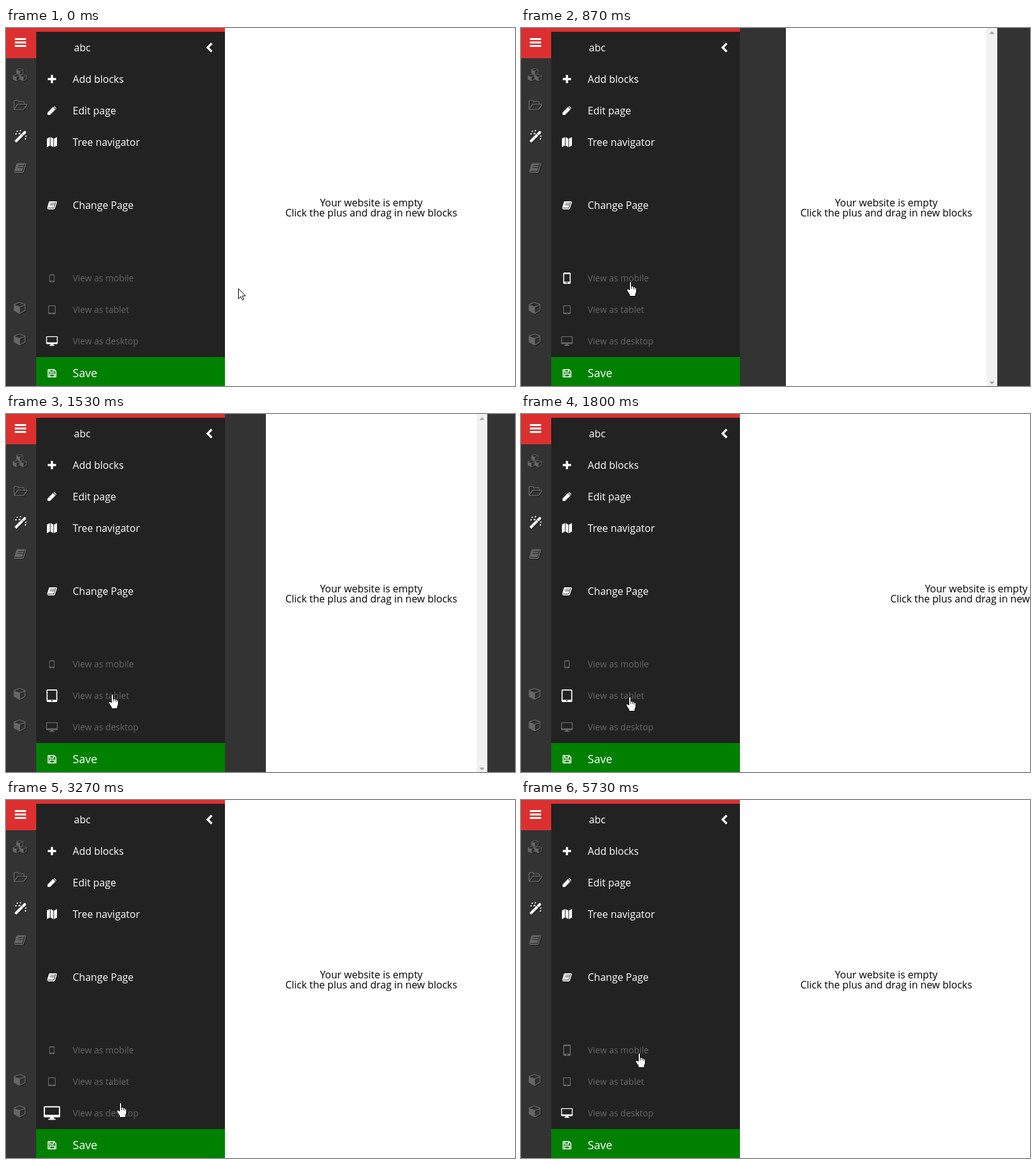
Animation, 809 px wide and 568 px high, one loop 5790 ms. Source, as an HTML page:

```html
<!DOCTYPE html>
<html lang="en">
<head>
<meta charset="utf-8">
<title>Responsive preview</title>
<style>
  html, body { margin: 0; width: 100%; height: 100%; overflow: hidden; background: #333; }
  svg { display: block; }
  text { font: 16px "Open Sans", sans-serif; fill: #fff; }
  .view { font-size: 14px; fill: #666; }
  .save { font-size: 18px; }
  .page { fill: #000; text-anchor: middle; }
  .rail { fill: #666; filter: drop-shadow(1px 1px 0 #181818); }
  .line { fill: none; stroke-linecap: round; stroke-linejoin: round; }
</style>
</head>
<body>
<svg width="809" height="568" viewBox="0 0 809 568">
  <defs>
    <path id="cube" fill-rule="evenodd" transform="scale(.0112) translate(-896 -896)" d="M896 1629l640-349v-636l-640 233zM832 764l698-254-698-254-698 254zM1664 512v768q0 74-71 114l-704 384q-57 32-122 0l-704-384q-71-40-71-114v-768q0-85 84-120l704-256q44-16 88 0l704 256q84 35 84 120z"/>
    <g id="book">
      <path d="M-4 -7.5H8Q9.500 -7 9 -5.500L5.500 5.500Q5 7 3.500 7H-6.500Q-9 6.500 -8.500 4L-5.500 -6Q-5 -7.500 -4 -7.500Z"/>
      <path class="line" stroke="#222" d="M-2.500 -4H5M-3.500 -1H4M-7 4.600H3.500L6.800 -6"/>
    </g>
  </defs>

  <rect width="809" height="568" fill="#333"/>
  <g id="site">
    <rect id="sheet" x="348" height="568" fill="#fff"/>
    <text class="page" y="283">Your website is empty</text>
    <text class="page" y="299">Click the plus and drag in new blocks</text>
    <g id="scrollbar">
      <rect x="-17" width="17" height="568" fill="#f1f1f1"/>
      <path fill="#a3a3a3" d="M-12.500 9.500h8l-4 -4.500zM-12.500 561h8l-4 4.500z"/>
    </g>
  </g>

  <rect width="48" height="568" fill="#333"/>
  <rect x="48" width="300" height="568" fill="#222"/>
  <path fill="#dc3030" d="M0 0H348V6H48V48H0Z"/>
  <rect x="48" y="522" width="300" height="46" fill="#008000"/>

  <path fill="#fff" d="M14 16h18v3h-18zM14 21.500h18v3h-18zM14 27h18v3h-18z"/>
  <g class="rail">
    <use href="#cube" transform="translate(22.500 69) scale(.6)"/>
    <use href="#cube" transform="translate(17 78.500) scale(.6)"/>
    <use href="#cube" transform="translate(28 78.500) scale(.6)"/>
    <path class="line" stroke="#666" stroke-width="1.500" d="M13 127V117Q13 115 15 115H18.500Q20 115 20 117H27Q29 117 29 119V121M13.500 128.500L18 122Q19 121 20 121H32Q34 121 33 122.500L29 128Q28 129.500 26 129.500H14.500Q13 129.500 13 127"/>
    <use href="#book" transform="translate(22.500 222.500) scale(1.080)"/>
    <use href="#cube" transform="translate(22.500 443.500)"/>
    <use href="#cube" transform="translate(22.500 493.500)"/>
    <g fill="#fff">
      <path d="M13.500 179L29 163.500Q30 162.800 31 163.800L32 165Q32.500 166 31.800 166.800L16.500 182Z"/>
      <path stroke="#333" d="M25.500 168.500l2.500 2.500l3 -3"/>
      <path d="M17 163h2v2h-2zM22 162h2v2h-2zM20 166.500h3v2h-3zM15 167h2v2h-2zM30.500 170.500h2v2h-2zM30 175h2v2h-2z"/>
    </g>
  </g>

  <g fill="#fff">
    <path class="line" stroke="#fff" stroke-width="3.400" style="stroke-linecap:butt" d="M66.500 81H79.500M73 74.500V87.500"/>
    <path d="M66 138V134L74.800 125.300L78.700 129.200L70 138ZM75.600 124.500Q76.500 123.700 77.500 124.500L79.500 126.500Q80.300 127.500 79.500 128.400Z"/>
    <path d="M65 175.500L69.800 173V186.500L65 189ZM70.800 173L75.300 175.500V189L70.800 186.500ZM76.300 175.500L81 173V186.500L76.300 189Z"/>
    <use href="#book" transform="translate(73 281.500) scale(.88)"/>
    <path class="line" stroke="#fff" stroke-width="3.400" style="stroke-linecap:butt;stroke-linejoin:miter" d="M327 24.500L320.500 31L327 37.500"/>
    <path class="line" stroke="#fff" stroke-width="1.500" d="M67 542H76.500L79.300 545V553.500H67ZM69.500 542V546H75.500V542M69.500 553.500V549H77V553.500"/>
  </g>
  <g id="labels"></g>

  <g fill-rule="evenodd">
    <path class="device" d="M-3 -6.300H3Q4.200 -6.300 4.200 -5V5Q4.200 6.300 3 6.300H-3Q-4.200 6.300 -4.200 5V-5Q-4.200 -6.300 -3 -6.300ZM-3.100 -4.500V3.800H3.100V-4.500ZM-.7 4.400V5.600H.7V4.400Z"/>
    <path class="device" d="M-4.600 -7H4.600Q6 -7 6 -5.600V5.600Q6 7 4.600 7H-4.600Q-6 7 -6 5.600V-5.600Q-6 -7 -4.600 -7ZM-4.800 -5.800V4.500H4.800V-5.800ZM-.6 5.100V6.300H.6V5.100Z"/>
    <path class="device" d="M-8 -7.500H8Q9.200 -7.500 9.200 -6.300V3.700Q9.200 5 8 5H2L2.500 6.500H4V7.800H-4V6.500H-2.500L-2 5H-8Q-9.200 5 -9.200 3.700V-6.300Q-9.200 -7.500 -8 -7.500ZM-7.800 -6.200V2.200H7.800V-6.200Z"/>
  </g>

  <g id="cursor" fill="#fff" stroke="#000" stroke-linejoin="round">
    <path id="arrow" d="M.5 .5V16.500L4.200 13L6.600 18.500L9 17.500L6.700 12H11.800Z"/>
    <g id="hand">
      <path d="M-1.500 2Q-1.500 .5 0 .5Q1.500 .5 1.500 2V8Q3.500 6.800 4.500 8.800Q6 7.800 7 9.600Q9.500 9 9.500 11.500V16Q9.500 18 8 20V23.500H-1.500V21Q-3 18.500 -5.500 15Q-6.500 12.500 -4.500 12Q-3 12 -1.500 14Z"/>
      <path fill="none" stroke-width=".8" d="M1.500 8V12M4.500 9V12M7 10V13"/>
    </g>
  </g>
</svg>
<script>
const LOOP = 5790, STEP = 200 / 3;
const PANEL_RIGHT = 348, DESKTOP = 482;
const MOBILE = 0, TABLET = 1, SCREEN = 2;
const $ = id => document.getElementById(id);

const labels = [
  ["abc", 108, 37], ["Add blocks", 106, 87], ["Edit page", 106, 137],
  ["Tree navigator", 106, 187], ["Change Page", 106, 287],
  ["View as mobile", 106, 402, "view"], ["View as tablet", 106, 452, "view"],
  ["View as desktop", 106, 502, "view"], ["Save", 106, 554, "save"]
];
$("labels").innerHTML = labels.map(([s, x, y, c = ""]) =>
  `<text x="${x}" y="${y}" class="${c}">${s}</text>`).join("");

// time, x, y of the pointer's hot spot
const path = [
  [0, 369, 413], [67, 369, 413], [200, 310, 429], [330, 235, 437], [430, 192, 419],
  [533, 174, 402], [980, 174, 402], [1267, 169, 444], [1533, 169, 444],
  [1800, 173, 448], [2067, 175, 452], [2200, 180, 494], [3130, 180, 494],
  [3340, 183, 472], [3467, 185, 455], [3933, 188, 402], [5700, 188, 402], [5733, 188, 401]
];
// time, device, width of the preview
const clicks = [[679, MOBILE, 320], [1508, TABLET, 768], [2834, SCREEN, DESKTOP]];
// from, to, device
const hovers = [
  [150, 415, TABLET], [415, 1110, MOBILE], [1110, 2115, TABLET],
  [2115, 3340, SCREEN], [3340, 3750, TABLET], [3750, LOOP, MOBILE]
];
const devices = [...document.querySelectorAll(".device")];
const lines = document.querySelectorAll(".page");

// cubic-bezier(.25, .1, .25, 1)
function ease(p) {
  if (p <= 0) return 0;
  if (p >= 1) return 1;
  const bezier = (s, a, b) => 3 * (1 - s) ** 2 * s * a + 3 * (1 - s) * s * s * b + s ** 3;
  let lo = 0, hi = 1;
  for (let i = 0; i < 24; i++) {
    const mid = (lo + hi) / 2;
    if (bezier(mid, .25, .25) < p) lo = mid; else hi = mid;
  }
  return bezier(lo, .1, 1);
}

function pointerAt(t) {
  const i = path.findIndex(k => k[0] > t);
  if (i < 0) return path[path.length - 1].slice(1);
  const [a, b] = [path[i - 1], path[i]], p = (t - a[0]) / (b[0] - a[0]);
  return [1, 2].map(n => Math.round(a[n] + (b[n] - a[n]) * p));
}

function draw(t) {
  let width = DESKTOP, active = SCREEN;
  for (const [start, device, target] of clicks) {
    if (t < start) break;
    active = device;
    width += (target - width) * ease((t - start) / 300);
  }
  const left = Math.round(PANEL_RIGHT + Math.max(0, (DESKTOP - width) / 2));
  $("sheet").setAttribute("x", left);
  $("sheet").setAttribute("width", Math.round(width));
  $("scrollbar").setAttribute("transform", `translate(${left + Math.round(width)})`);
  lines.forEach(el => el.setAttribute("x", left + (Math.round(width) - 17) / 2));

  devices.forEach((el, i) => {
    const level = hovers.filter(h => h[2] === i).reduce((sum, [from, to]) =>
      sum + ease((t - from) / 150) - ease((t - to) / 150), 0);
    el.setAttribute("transform", `translate(73 ${[397, 447, 496.5][i]}) scale(${1 + .42 * level})`);
    el.setAttribute("fill", i === active ? "#fff" : "#666");
  });

  const [x, y] = pointerAt(t), onPanel = x < PANEL_RIGHT;
  $("cursor").setAttribute("transform", `translate(${x} ${y})`);
  $("arrow").style.display = onPanel ? "none" : "";
  $("hand").style.display = onPanel ? "" : "none";
}

const begin = performance.now();
function tick() {
  const t = (performance.now() - begin) % LOOP;
  draw(Math.floor((t + 5) / STEP) * STEP);
  requestAnimationFrame(tick);
}
tick();
</script>
</body>
</html>
```
